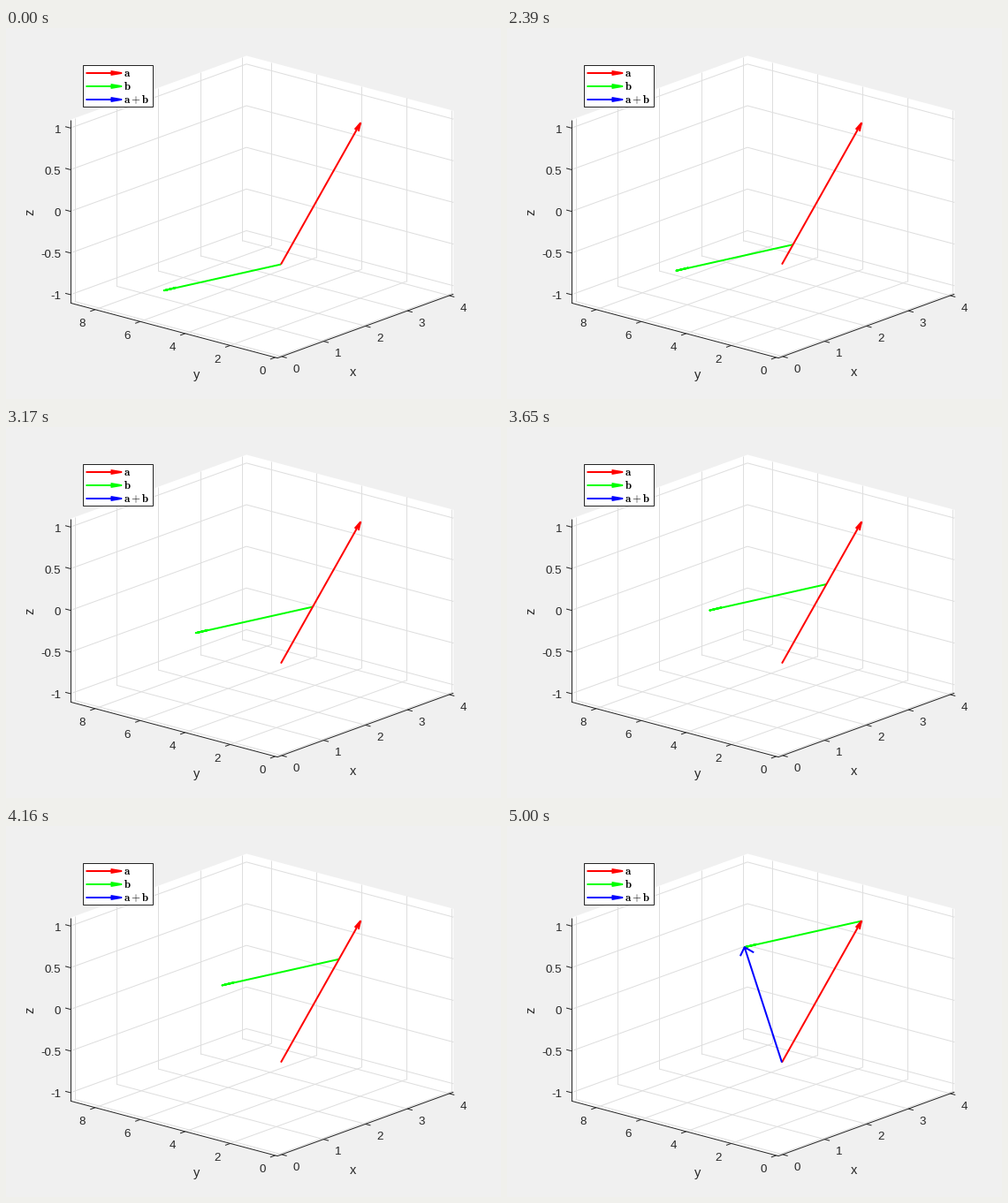
A matplotlib script that plays this animation: 560 px wide and 420 px high, repeating every 9000 ms.

```python
import numpy as np
import matplotlib.pyplot as plt
from matplotlib.animation import FuncAnimation
from matplotlib.collections import LineCollection

W, H, DPI = 560, 420, 100
PX = 72 / DPI                       # points per pixel
STEP, LOOP = 10, 9000               # ms
START, MOVE, END = 2000, 30, 5000   # ms
INK, GRID = "#262626", "#dedede"
RED, GREEN, BLUE = "#ff0000", "#00ff00", "#0000ff"

plt.rcParams["font.family"] = "Liberation Sans"
plt.rcParams["mathtext.fontset"] = "cm"

# axis limits and the projection to pixels
X0, X1 = -0.1, 4.1
Y0, Y1 = -0.1, 9.1
Z0, Z1 = -1.1, 1.1
CORNER = np.array([307.1, 373.6])
EX = np.array([199.1, -72.4]) / (X1 - X0)
EY = np.array([-234.2, -62.3]) / (Y1 - Y0)
EZ = np.array([0, -207.5]) / (Z1 - Z0)

XT, YT, ZT = range(5), range(0, 9, 2), (-1, -0.5, 0, 0.5, 1)

ORIGIN = np.array([311.0, 267.6])
A = np.array([90.0, -160.0])
B = np.array([-132.3, 29.6])


def project(x, y, z):
    return CORNER + (x - X0) * EX + (y - Y0) * EY + (z - Z0) * EZ


def label(p, s, size=13.33, ha="center", **kw):
    ax.text(p[0], p[1], s, fontsize=size * PX, ha=ha, va="baseline",
            color=kw.pop("color", INK), **kw)


def lines(segs, color, width=1):
    ax.add_collection(LineCollection(segs, colors=color,
                                     linewidths=width * PX))


def arrow(tail, tip, wings):
    """Polyline of a shaft and two head strokes, given as offsets from the tip."""
    tip = np.asarray(tip)
    return np.array([tail, tip, (np.nan, np.nan),
                     tip + wings[0], tip, tip + wings[1]]).T


def stroke(color, z):
    return ax.plot([], [], color=color, lw=2 * PX, zorder=z,
                   solid_capstyle="butt", solid_joinstyle="round")[0]


fig = plt.figure(figsize=(W / DPI, H / DPI), dpi=DPI, facecolor="#f0f0f0")
ax = fig.add_axes([0, 0, 1, 1])
ax.set_axis_off()
ax.set_xlim(0, W)
ax.set_ylim(H, 0)

# walls and floor
outline = [project(*c) for c in (
    (X0, Y1, Z1), (X1, Y1, Z1), (X1, Y0, Z1),
    (X1, Y0, Z0), (X0, Y0, Z0), (X0, Y1, Z0))]
ax.add_patch(plt.Polygon(outline, fc="white", ec="none", zorder=0))

grid = []
for x in XT:
    grid.append([project(x, Y0, Z0), project(x, Y1, Z0), project(x, Y1, Z1)])
for y in YT:
    grid.append([project(X0, y, Z0), project(X1, y, Z0), project(X1, y, Z1)])
for z in ZT:
    grid.append([project(X0, Y1, z), project(X1, Y1, z), project(X1, Y0, z)])
lines([s for g in grid for s in (g[:2], g[1:])], GRID)

# rulers, ticks and labels
rulers = [outline[3:], [outline[5], outline[0]]]
out_x = -EY / np.hypot(*EY) * 6
out_y = -EX / np.hypot(*EX) * 6
for x in XT:
    p = project(x, Y0, Z0)
    rulers.append([p, p + out_x])
    label(p + (16.1, 17.7), str(x))
for y in YT:
    p = project(X0, y, Z0)
    rulers.append([p, p + out_y])
    label(p + (-14.5, 19.3), str(y))
for z in ZT:
    p = project(X0, Y1, z)
    rulers.append([p, p - out_x])
    label((62, p[1] + 5.3), f"{z:g}", ha="right")
lines(rulers, INK)
label((393, 394.5), "x", 14.67)
label((215.5, 397), "y", 14.67)
label((31, 208.5), "z", 14.67, rotation=90, rotation_mode="anchor")

# legend
ax.add_patch(plt.Rectangle((87, 42), 79, 47, fc="white", ec=INK,
                           lw=PX, zorder=5))
KEYS = ((RED, r"$\mathbf{a}$"), (GREEN, r"$\mathbf{b}$"),
        (BLUE, r"$\mathbf{a}+\mathbf{b}$"))
for i, (color, name) in enumerate(KEYS):
    y = 51 + 15 * i
    stroke(color, 6).set_data(
        *arrow((90.5, y), (130.5, y), [(-12, -2), (-12, 2)]))
    label((133, y + 4), name, 12.8, ha="left", color="black", zorder=6)

# vectors
vec_b, vec_a, vec_sum = stroke(GREEN, 2), stroke(RED, 3), stroke(BLUE, 4)
vec_a.set_data(*arrow(ORIGIN, ORIGIN + A, [(-6.4, 7.2), (-2.2, 9.4)]))
vec_sum.set_data(*arrow(ORIGIN, ORIGIN + A + B, [(-4.8, 10), (10.5, 6)]))


def update(i):
    ms = i * STEP
    t = min(max((ms - START) // MOVE + 1, 0), 100) / 100
    tail = ORIGIN + t * A
    vec_b.set_data(*arrow(tail, tail + B, [(14, -3.6), (13, -2.9)]))
    vec_sum.set_visible(ms >= END)
    return vec_b, vec_sum


anim = FuncAnimation(fig, update, frames=LOOP // STEP, interval=STEP,
                     init_func=lambda: update(0), repeat=True,
                     repeat_delay=0, cache_frame_data=False)
plt.show()
```
